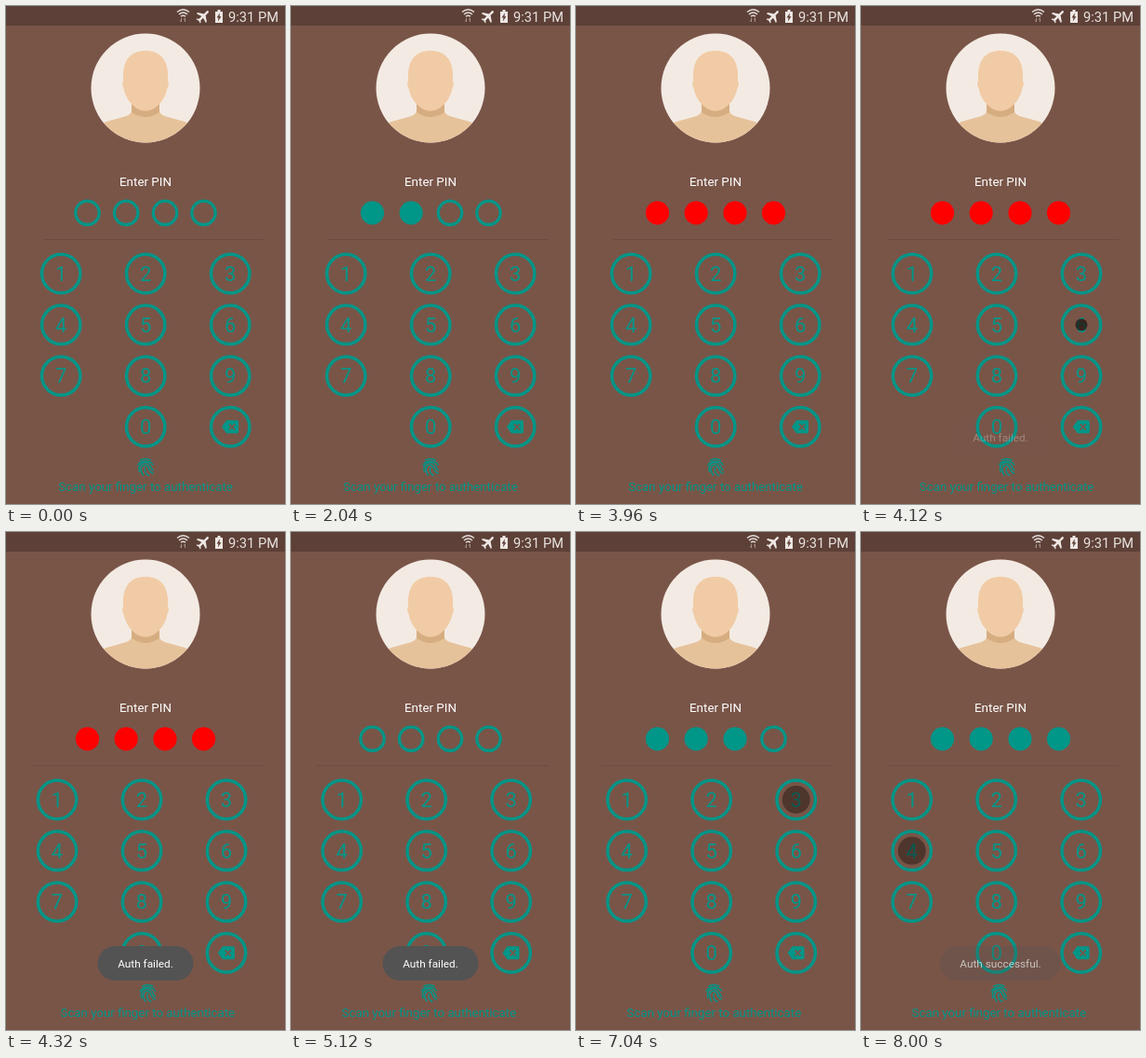
Write an HTML page that moves like this. It is 300 px wide and 534 px high and loops after 8.04 s.

```html
<!DOCTYPE html>
<html lang="en">
<head>
<meta charset="utf-8">
<title>PIN lock screen</title>
<style>
  html, body { margin: 0; width: 100%; height: 100%; overflow: hidden; background: #795548; }
  svg { display: block; width: 100vw; height: 100vh; font-family: Roboto, sans-serif; }
  .mid { text-anchor: middle; }
  .line { fill: none; stroke: #009688; }
</style>
</head>
<body>
<svg viewBox="0 0 300 534">
  <defs><clipPath id="round"><circle cx="150" cy="88" r="58.5"/></clipPath></defs>
  <rect width="300" height="534" fill="#795548"/>
  <rect width="300" height="21" fill="#5d4037"/>

  <g fill="none" stroke="#e3dcd9" stroke-width="1.4">
    <path d="M184 6.5Q190.500 1 197 6.500M186 9Q190.500 5 195 9M188 11.300Q190.500 9.200 193 11.300"/>
    <path d="M188.500 13v4m-1.500-1.500l1.500 1.500M192.500 17v-4m-1.500 1.500l1.500-1.500" stroke="#a8948c" stroke-width="1"/>
  </g>
  <path transform="translate(212 11) rotate(45)" fill="#eee8e5"
    d="M-1.200-7Q0-9 1.200-7V-2.500L7 1.500V3L1.200 1.200V5L3 6.500V7.500L0 6.700L-3 7.500V6.500L-1.200 5V1.200L-7 3V1.500L-1.200-2.500Z"/>
  <path d="M225 6h2.500V4h3v2h2.500v12h-8z" fill="#eee8e5"/>
  <path d="M230 7.500l-3.500 5h2l-.7 4 3.700-5.300h-2z" fill="#5d4037"/>
  <text x="239" y="16.800" font-size="14.700" fill="#e8e2df">9:31 PM</text>

  <g clip-path="url(#round)">
    <rect x="90" y="28" width="120" height="120" fill="#f3ebe3"/>
    <path d="M135 98V113Q134 117 126 119L108 124Q98 127 90 150H210Q202 127 192 124L174 119Q166 117 165 113V98Z" fill="#e6c29b"/>
    <path d="M135 98V114Q150 124 165 114V98Z" fill="#d6ad80"/>
    <path d="M150 48C166 48 174 58 174 74V80Q176 83 173.500 88C171 102 160 112.500 150 112.500S129 102 126.500 88Q124 83 126 80V74C126 58 134 48 150 48Z" fill="#f1cba5"/>
  </g>

  <text class="mid" x="150" y="192.500" font-size="13.400" fill="#fff">Enter PIN</text>
  <g id="dots"></g>
  <line id="divider" x2="277" y1="250.500" y2="250.500" stroke="#6d4b3f"/>
  <g id="keys"></g>
  <g id="hint">
    <g class="line" stroke-width="1.500" stroke-linecap="round" transform="translate(150 494.500)">
      <path d="M-5.500-7.500Q0-10.500 5.500-7.500M-8-2.500C-5-8 5-8 8-2.500M-6.500 5C-9-5 0-6 3-4S6.500 3 8 3.500M-2.500 8.500C-7 2-4-2.500 0-2.500S3 6 8 6.500M3.500 9C-1 7-1 3 0 .5"/>
    </g>
    <text class="mid" x="150" y="519.800" font-size="13.300" fill="#009688">Scan your finger to authenticate</text>
  </g>
  <g id="toast">
    <rect y="444" height="37" rx="18.500" fill="#535353"/>
    <text class="mid" x="150" y="467" font-size="11.800" fill="#fff"></text>
  </g>
</svg>
<script>
const LOOP = 8040, TEAL = '#009688', RED = '#ff0000';
const FAIL = 3960, RESET = 5120, SUCCESS = 7760;
const PRESSES = [[1160, 1], [2040, 2], [2960, 5], [FAIL, 6], [5360, 1], [5960, 2], [6800, 3], [SUCCESS, 4]];
const HINT_SHAKE = [0, 7, -7, 7, -7, 4.2, -4.2, 1.7, -1.6];
const KEY_SHAKE = [0, -4.5, 6, -7, 5, -6, 4, 1, -4.5];

const $ = id => document.getElementById(id);
const clamp = v => Math.max(0, Math.min(1, v));
const ramp = (t, from, to) => clamp((t - from) / (to - from));
const set = (el, attrs) => { for (const k in attrs) el.setAttribute(k, attrs[k]); };

function add(parent, tag, attrs, text = '') {
  const el = document.createElementNS('http://www.w3.org/2000/svg', tag);
  set(el, attrs);
  el.textContent = text;
  return parent.appendChild(el);
}

const dots = [87.5, 129.2, 171, 212.5].map(cx =>
  add($('dots'), 'circle', { cx, cy: 221.8, stroke: TEAL, 'stroke-width': 3.3 }));

const keyPos = n => n === 0 ? [150.2, 451.3] : [59.2 + (n - 1) % 3 * 91, 287 + Math.floor((n - 1) / 3) * 54.8];

function addKey(x, y, label) {
  add($('keys'), 'circle', { class: 'line', cx: x, cy: y, r: 20.7, 'stroke-width': 3.5 });
  if (label !== undefined)
    add($('keys'), 'text', { class: 'mid', x, y: y + 7.8, 'font-size': 22, fill: TEAL }, label);
}
for (let n = 0; n < 10; n++) addKey(...keyPos(n), n);
addKey(241.2, 451.3);
add($('keys'), 'path', { d: 'M232 451.3L237 444.300H248.500Q250 444.300 250 446V456.600Q250 458.300 248.500 458.300H237Z', fill: TEAL });
add($('keys'), 'path', { d: 'M240 448.300l6 6m0-6l-6 6', stroke: '#795548', 'stroke-width': 1.7 });
const ripple = add($('keys'), 'circle', { fill: '#1c0f0c' });

function shake(values, t) {
  const eased = (1 - Math.cos(Math.PI * ramp(t, 3980, 4580))) / 2;
  const pos = eased * (values.length - 1);
  const i = Math.min(Math.floor(pos), values.length - 2);
  return values[i] + (values[i + 1] - values[i]) * (pos - i);
}

function drawDots(t) {
  const count = PRESSES.filter(([at]) => at <= t && (t < RESET || at >= RESET)).length;
  const color = t >= FAIL && t < RESET ? RED : TEAL;
  dots.forEach((dot, i) => {
    const full = i < count;
    set(dot, { r: full ? 12.6 : 12.7, fill: full ? color : 'none', stroke: full ? 'none' : TEAL });
  });
}

function drawRipple(t) {
  const press = PRESSES.find(([at]) => t >= at && t < at + 360);
  if (!press) return set(ripple, { opacity: 0 });
  const age = t - press[0], [cx, cy] = keyPos(press[1]);
  const r = age < 240 ? 6.5 + (age - 160) * .106 : 15 + (age - 240) * .045;
  const opacity = age < 100 ? 0 : age < 160 ? .7 : .7 * (1 - ramp(age, 160, 360)) ** .9;
  set(ripple, { cx, cy, r: Math.max(0, r), opacity });
}

function drawToast(t) {
  const won = t >= SUCCESS;
  const [box, text] = $('toast').children;
  const fadeIn = won ? ramp(t, 7800, 8110) : ramp(t, 4040, 4320);
  const fadeOut = won ? 1 : 1 - ramp(t, 6080, 6480);
  set(box, { x: won ? 85 : 98.5, width: won ? 130 : 103, opacity: fadeIn ** 3 * fadeOut ** 2 });
  set(text, { opacity: fadeIn * Math.sqrt(fadeOut) });
  text.textContent = won ? 'Auth successful.' : 'Auth failed.';
}

function draw(t) {
  set($('keys'), { transform: `translate(${shake(KEY_SHAKE, t)} 0)` });
  set($('hint'), { transform: `translate(${shake(HINT_SHAKE, t)} 0)` });
  set($('divider'), { x1: t < 4080 ? 40 : 28 });
  drawDots(t);
  drawRipple(t);
  drawToast(t);
}

let start;
function tick(now) {
  start ??= now;
  draw((now - start) % LOOP);
  requestAnimationFrame(tick);
}
draw(0);
requestAnimationFrame(tick);
</script>
</body>
</html>
```
